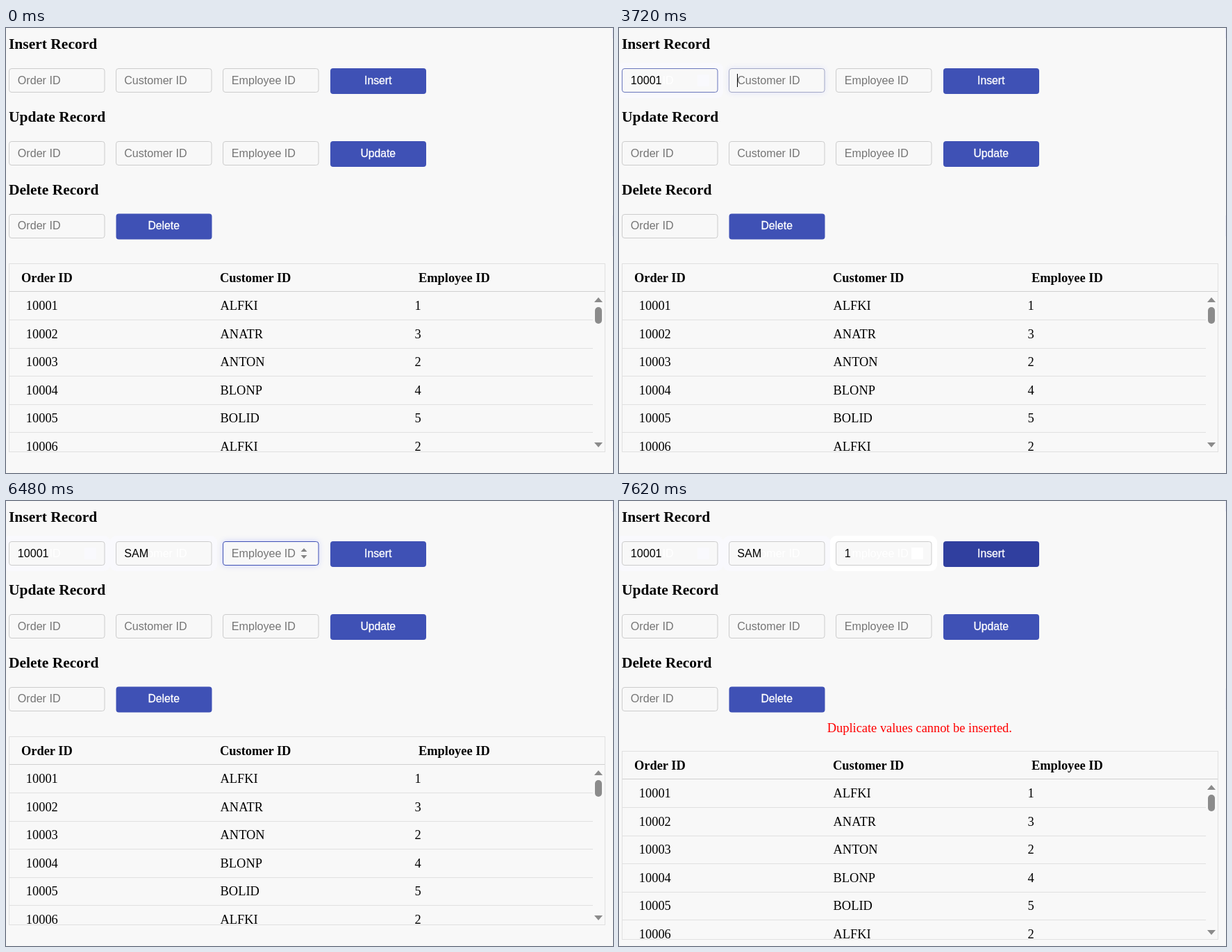
Recreate the animation shown at these times as an HTML page. Size 874 by 641 pixels, loop 8 s.

```html
<!DOCTYPE html>
<html lang="en">
<head>
<meta charset="utf-8">
<title>Record form</title>
<style>
  html, body { margin: 0; width: 100%; height: 100%; overflow: hidden; background: #f8f8f8; }
  svg { display: block; width: 874px; height: 641px; }
  text { white-space: pre; }
  .head, .th, .td, .error { font-family: "Liberation Serif", "Times New Roman", serif; font-size: 18.4px; }
  .head, .th { font-weight: bold; }
  .head { font-size: 21.5px; }
  .error { fill: #f00; }
  .ui { font-family: "Liberation Sans", Arial, sans-serif; font-size: 16.1px; }
  .hint { fill: #757575; }
  .label { fill: #fff; stroke: #fff; stroke-width: .3px; font-size: 15.7px; text-anchor: middle; }
  .glow { fill: #4f5fff; filter: blur(4px); }
</style>
</head>
<body>
<svg id="stage" viewBox="0 0 874 641"></svg>
<script>
const LOOP = 8000, STEP = 60;
const BG = '#f8f8f8', GREY = [204, 204, 204], BLUE = [63, 81, 181];
const stage = document.getElementById('stage');

function add(parent, tag, attrs, content) {
  const node = document.createElementNS('http://www.w3.org/2000/svg', tag);
  for (const key in attrs) node.setAttribute(key, attrs[key]);
  if (content !== undefined) node.textContent = content;
  parent.append(node);
  return node;
}
const rect = (parent, x, y, width, height, fill, more) =>
  add(parent, 'rect', { x, y, width, height, fill, ...more });
const text = (parent, cls, x, y, content) =>
  add(parent, 'text', { class: cls, x, y }, content);
const show = (node, on) => { node.style.display = on ? '' : 'none'; };
const baseline = y => Math.floor(y + 23);

const hints = ['Order ID', 'Customer ID', 'Employee ID'];
const columns = [4, 158, 312];
const textLefts = [16.8, 170.2, 324.8];

function addField(column, y) {
  const x = columns[column], top = Math.round(y);
  const halo = rect(stage, x - 8, top - 8, 154, 51, '#fff', { rx: 9 });
  const glow = rect(stage, x, top, 138, 35, '', { class: 'glow', rx: 4 });
  const box = rect(stage, x + .5, top + .5, 137.5, 34, BG, { rx: 3.5, stroke: '#ccc' });
  const hint = text(stage, 'ui hint', textLefts[column], baseline(y), hints[column]);
  show(halo, false);
  glow.style.opacity = 0;
  return { x, y, halo, glow, box, hint };
}

function addButton(x, y, label) {
  const face = rect(stage, x, y, 138, 37, '#3f51b5', { rx: 4 });
  text(stage, 'ui label', x + 68.7, baseline(y), label);
  return face;
}

// Static form
['Insert Record', 'Update Record', 'Delete Record'].forEach((title, i) =>
  text(stage, 'head', 4, 30 + 105 * i, title));
const inputs = hints.map((hint, i) => addField(i, 58));
hints.forEach((hint, i) => addField(i, 163));
addField(0, 267.5);
const insertButton = addButton(467, 58, 'Insert');
addButton(467, 163, 'Update');
addButton(158.5, 267.5, 'Delete');
rect(stage, 873, 0, 1, 15, '#e8e8fb');
rect(stage, 873, 270, 1, 30, '#ececf8');

const error = text(stage, 'error', 299.8, 333, 'Duplicate values cannot be inserted.');

// Table
const rows = [
  ['10001', 'ALFKI', '1'], ['10002', 'ANATR', '3'], ['10003', 'ANTON', '2'],
  ['10004', 'BLONP', '4'], ['10005', 'BOLID', '5'], ['10006', 'ALFKI', '2']
];
const table = add(stage, 'g', {});
const clip = add(add(stage, 'defs', {}), 'clipPath', { id: 'body' });
rect(clip, 4, 380, 859, 231, '#000');
rect(table, 4.5, 339.5, 858, 271, 'none', { stroke: '#e0e0e0' });
rect(table, 5, 379, 857, 1, '#d0d0d0');
hints.forEach((name, i) => text(table, 'th', 22 + 286 * i, 366, name));
const body = add(table, 'g', { 'clip-path': 'url(#body)' });
rows.forEach((row, r) => {
  row.forEach((cell, c) =>
    text(body, 'td', 28.8 + 279.8 * c, Math.round(406.3 + 40.5 * r), cell));
  rect(body, 5, Math.floor(420.5 + 40.5 * r), 840, 1, '#e0e0e0');
});
add(table, 'path', { d: 'M847 395L853 388L859 395ZM847 597H859L853 604Z', fill: '#8b8b8b' });
rect(table, 848, 402, 10, 24, '#8b8b8b', { rx: 5 });

// What happens in each insert field; trace tints the area after it loses focus
const acts = [
  { on: 1080, off: 3720, value: '10001', keys: [1800, 2040, 2160, 2340, 2760],
    carets: [17, 25, 34, 43, 52, 61], spin: [720, 3720], hover: [3300, 3420], trace: '#f9f9fd' },
  { on: 3720, off: 6000, value: 'SAM', keys: [4440, 4680, 4980],
    carets: [170, 180, 192, 204], trace: '#f9f9fd' },
  { on: 6000, off: 7260, value: '1', keys: [6720],
    carets: [325, 333], spin: [5820, 7260], hover: [6780, 6900], trace: '#fff' }
];

acts.forEach((act, i) => {
  const field = act.field = inputs[i];
  const { x, y } = field;
  field.halo.setAttribute('fill', act.trace);
  act.cover = rect(stage, x + 11, y + 7, 0, 21, BG);
  act.typed = text(stage, 'ui', textLefts[i], baseline(y), '');
  act.caret = rect(stage, 0, y + 8, 1, 19, '#000');
  if (act.spin) {
    const left = x + 112.5;
    act.ghost = rect(stage, x + 109, y + 9, 17, 17, act.trace);
    act.arrows = add(stage, 'path', {
      d: `M${left} ${y + 15}l4.5 -5l4.5 5ZM${left} ${y + 20}h9l-4.5 5Z`
    });
  }
});

const within = (t, [from, to]) => t >= from && t < to;

function ramp(t, start) {
  if (t < start) return 0;
  return [.3, .6, .85][Math.floor((t - start) / STEP)] || 1;
}

function drawField(act, t) {
  const { field, keys, carets } = act;
  const left = t >= act.off;
  const focus = ramp(t, act.on) - ramp(t, act.off);
  const mix = GREY.map((g, i) => Math.round(g + (BLUE[i] - g) * focus));
  field.box.setAttribute('stroke', `rgb(${mix})`);
  field.glow.style.opacity = left ? 0 : .25 * Math.sqrt(focus);
  show(field.halo, left);

  const count = keys.filter(key => t >= key).length;
  act.typed.textContent = act.value.slice(0, count);
  field.hint.style.fill = count ? '#fff' : '';
  act.cover.setAttribute('width', count ? carets[count] - field.x - 10 : 0);

  const last = count ? keys[count - 1] : act.on;
  act.caret.setAttribute('x', carets[count]);
  show(act.caret, within(t, [act.on, act.off]) && t - last < 480);

  if (act.spin) {
    show(act.ghost, left);
    show(act.arrows, within(t, act.spin));
    act.arrows.setAttribute('fill', within(t, act.hover) ? '#606060' : '#858585');
  }
}

function draw(now) {
  const t = Math.floor((now % LOOP) / STEP) * STEP;
  acts.forEach(act => drawField(act, t));
  insertButton.setAttribute('fill', t >= 7080 ? '#303f9f' : '#3f51b5');
  const failed = t >= 7620;
  show(error, failed);
  table.setAttribute('transform', `translate(0 ${failed ? 21 : 0})`);
}

const start = performance.now();
function tick() {
  draw(performance.now() - start);
  requestAnimationFrame(tick);
}
tick();
</script>
</body>
</html>
```
